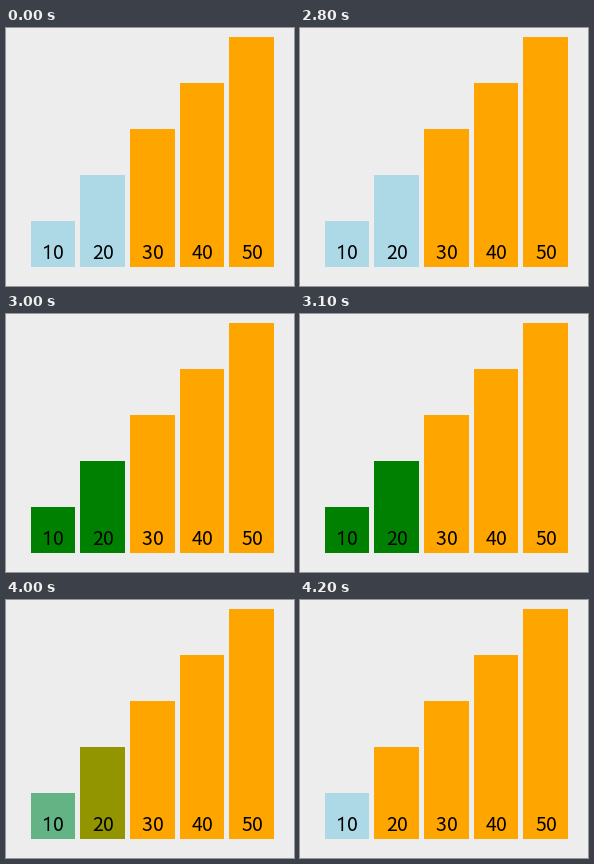
These frames come from a looping animation (288x258 px, 6300 ms). A matplotlib script:

```python
import matplotlib.pyplot as plt
import numpy as np
from matplotlib.animation import FuncAnimation
from matplotlib.colors import to_rgb
from matplotlib.patches import Polygon, Rectangle

W, H = 288, 258
STEP_MS, LOOP_MS = 100, 6300
BAR_LEFT, PITCH, BAR_WIDTH, BASE = 24.8, 49.65, 44.6, 239
UNIT = 4.6  # bar height in pixels per counted unit
FONT_PX, DIGIT, BASELINE = 19.4, 10.8, 231
BLUE, GREEN, ORANGE = (np.array(to_rgb(c)) for c in ("lightblue", "green", "orange"))

plt.rcParams["toolbar"] = "None"
fig = plt.figure(figsize=(W / 72, H / 72), dpi=72, facecolor="#ededed")
ax = fig.add_axes([0, 0, 1, 1])
ax.set_xlim(0, W)
ax.set_ylim(H, 0)
ax.axis("off")


def draw_one(x):
    """A footless figure one whose cell starts at x."""
    shape = [(4.9, 0), (4.9, -11.9), (3.3, -10.9), (1.5, -10.2), (1.5, -11.8),
             (3.9, -12.9), (5.8, -14.2), (6.5, -14.2), (6.5, 0)]
    points = [(x + dx, BASELINE + dy) for dx, dy in shape]
    ax.add_patch(Polygon(points, color="black", lw=0, zorder=3))


def draw_label(center, value):
    for k, char in enumerate(str(value)):
        x = center + (k - 1) * DIGIT
        if char == "1":
            draw_one(x)
        else:
            ax.text(x + DIGIT / 2, BASELINE, char, fontsize=FONT_PX,
                    family="Noto Sans CJK JP", ha="center", va="baseline", zorder=3)


bars = []
for i in range(5):
    value = 10 * (i + 1)
    x, height = BAR_LEFT + i * PITCH, value * UNIT
    bar = Rectangle((x, BASE - height), BAR_WIDTH, height, lw=0,
                    facecolor=BLUE if i < 2 else ORANGE)
    bars.append(ax.add_patch(bar))
    draw_label(x + BAR_WIDTH / 2 + 0.3, value)


def progress(t, start, duration=200):
    """Eased share of a colour fade, from 0 to 1."""
    u = np.clip((t - start) / duration, 0, 1)
    return u * u * (3 - 2 * u)


def update(frame):
    t = frame * STEP_MS
    mark = progress(t, 2800)
    release = progress(t, 3890)
    for bar, final in zip(bars, (BLUE, ORANGE)):
        color = BLUE + (GREEN - BLUE) * mark
        bar.set_facecolor(color + (final - color) * release)
    return bars[:2]


anim = FuncAnimation(fig, update, frames=LOOP_MS // STEP_MS, interval=STEP_MS,
                     repeat=True, repeat_delay=0, blit=False)
plt.show()
```
